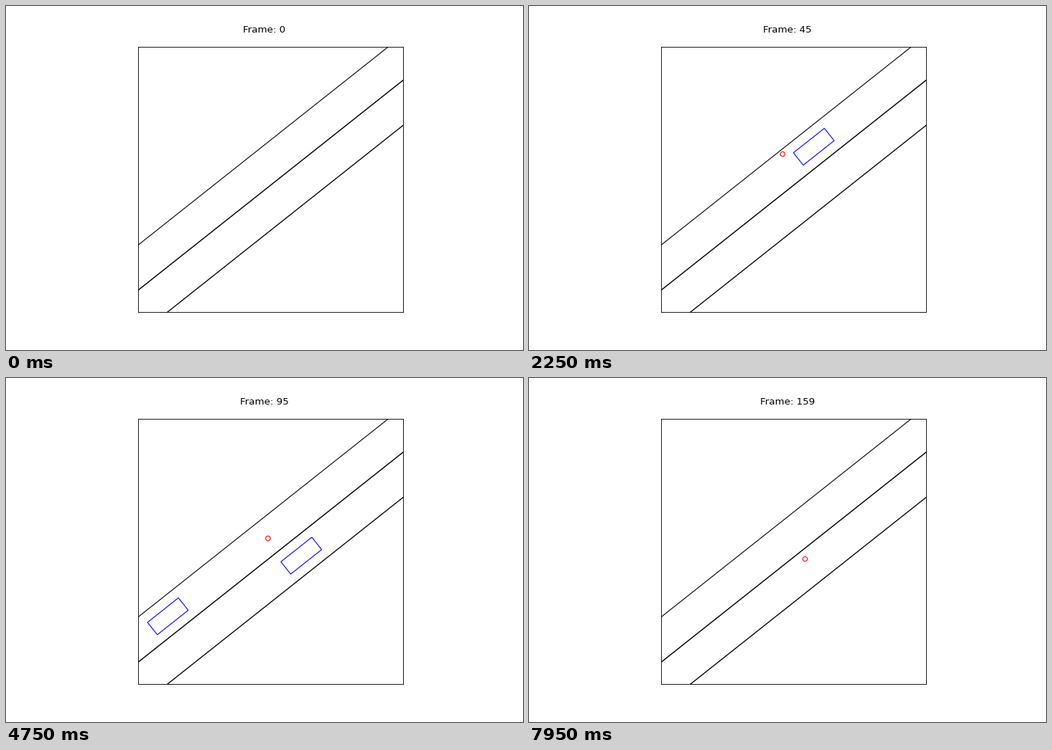
Recreate the animation shown at these times as a matplotlib script. Size 720 by 480 pixels, loop 8000 ms.

```python
import numpy as np
import matplotlib.pyplot as plt
from matplotlib.animation import FuncAnimation
from matplotlib.patches import Circle, Polygon

W, H, DPI = 720, 480, 80
FRAMES, INTERVAL = 160, 50
LEFT, RIGHT, TOP, BOTTOM = 184.2, 553.4, 57.4, 427.2

plt.rcParams["font.family"] = "DejaVu Sans"
fig = plt.figure(figsize=(W / DPI, H / DPI), dpi=DPI, facecolor="white")
ax = fig.add_axes([LEFT / W, 1 - BOTTOM / H, (RIGHT - LEFT) / W, (BOTTOM - TOP) / H])
ax.set(xlim=(LEFT, RIGHT), ylim=(BOTTOM, TOP), xticks=[], yticks=[])
title = fig.text(0.5, 0.9225, "", fontsize=12, ha="center")

# Road: three parallel lines, x to the right and y down in pixels
SLOPE = -0.794
for y_left, width in ((333.4, 1.0), (396.4, 1.3), (459.4, 1.2)):
    ax.plot([LEFT, RIGHT], [y_left, y_left + SLOPE * (RIGHT - LEFT)],
            color="black", lw=width)

ALONG = np.array([1, SLOPE]) / np.hypot(1, SLOPE)
ACROSS = np.array([-ALONG[1], ALONG[0]])
CAR_LENGTH, CAR_WIDTH = 55.0, 22.0
WALK_DIR = np.array([0.562, 0.827])
WALK_START = np.array([349.9, 201.7])
WALK_ACCEL, WALK_SPEED = 0.0059, 0.545


def make_car():
    return ax.add_patch(Polygon(np.zeros((4, 2)), closed=True, fill=False,
                                ec="blue", lw=1, zorder=3))


cars = [make_car(), make_car()]
walker = ax.add_patch(Circle(WALK_START, 3.2, fill=False, ec="red", lw=1, zorder=4))


def car_corners(center):
    a, b = ALONG * CAR_LENGTH / 2, ACROSS * CAR_WIDTH / 2
    return np.array([center + a - b, center + a + b, center - a + b, center - a - b])


def down_car(n):
    """Steady drive in the upper lane, towards the lower left."""
    return np.array([495.9, 117.4]) + (n - 16) * np.array([-3.424, 2.7228])


def up_car(n):
    """Slowly braking drive in the lower lane, towards the upper right."""
    x = 308.7 + 6.833 * (n - 80) - 0.0091 * (n - 80) * (n - 95)
    return np.array([x, 329.5 + (x - 308.7) * -0.796])


def walked(n):
    """Distance covered: speeds up evenly, then keeps a constant pace."""
    ramp = WALK_SPEED / WALK_ACCEL
    t = min(n, ramp)
    return WALK_ACCEL * t * t / 2 + WALK_SPEED * max(n - ramp, 0)


def update(n):
    title.set_text(f"Frame: {n}")
    for car, path, first, last in ((cars[0], down_car, 1, 114),
                                   (cars[1], up_car, 62, 122)):
        car.set_visible(first <= n <= last)
        car.set_xy(car_corners(path(n)))
    walker.set_visible(n > 0)
    walker.center = WALK_START + walked(n) * WALK_DIR
    return [title, walker, *cars]


anim = FuncAnimation(fig, update, frames=FRAMES, interval=INTERVAL,
                     init_func=lambda: update(0), repeat=True, repeat_delay=0)
plt.show()
```
